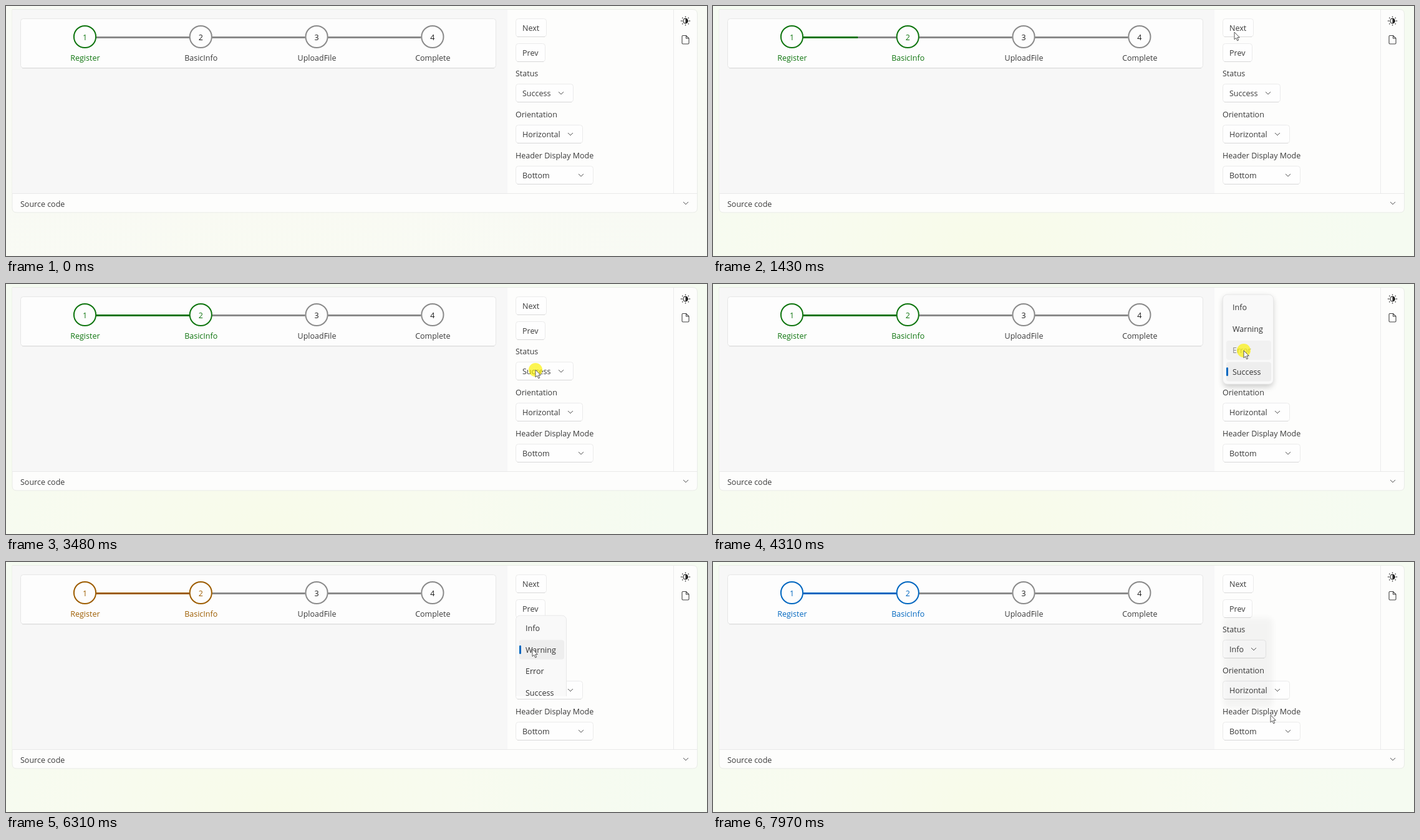
These frames come from a looping animation (1124x402 px, 8000 ms). An HTML page:

```html
<!DOCTYPE html>
<html lang="en">
<head>
<meta charset="utf-8">
<title>Step bar demo</title>
<style>
  html, body { margin: 0; width: 100%; height: 100%; overflow: hidden; background: #f9faf5; }
  svg { display: block; font: 12.5px "Open Sans", "Noto Sans", sans-serif; }
  text { fill: #3a3a3a; white-space: pre; }
  .mid { text-anchor: middle; }
</style>
</head>
<body>
<svg id="stage" width="1124" height="402" viewBox="0 0 1124 402">
  <defs>
    <radialGradient id="tint" gradientUnits="userSpaceOnUse" cx="430" cy="402" r="640" gradientTransform="translate(0 180) scale(1 .55)">
      <stop offset="0" stop-color="#f8fbe9"/>
      <stop offset=".45" stop-color="#f8fbef"/>
      <stop offset="1" stop-color="#f5fbf1"/>
    </radialGradient>
    <filter id="blur" x="-30%" y="-30%" width="160%" height="160%"><feGaussianBlur stdDeviation="5"/></filter>
    <clipPath id="reveal"><rect id="revealBox" x="810" width="100"/></clipPath>
  </defs>
</svg>
<script>
const LOOP = 8000;
const GREY = '#8a8a8a', ACCENT = '#0067c0';
const stage = document.getElementById('stage');
const revealBox = document.getElementById('revealBox');

function set(node, attrs) {
  for (const key in attrs) node.setAttribute(key, attrs[key]);
  return node;
}
function el(tag, attrs, parent = stage) {
  return parent.appendChild(set(document.createElementNS('http://www.w3.org/2000/svg', tag), attrs));
}
function rect(x, y, width, height, fill, extra = {}, parent) {
  return el('rect', { x, y, width, height, fill, ...extra }, parent);
}
function label(x, middle, content, extra = {}, parent) {
  const node = el('text', { x, y: middle + 4.5, ...extra }, parent);
  node.textContent = content;
  return node;
}
function chevron(x, y, parent) {
  return el('path', { d: `M${x - 4} ${y - 2}l4 4l4 -4`, fill: 'none', stroke: '#555' }, parent);
}
const show = (node, on) => set(node, { visibility: on ? 'visible' : 'hidden' });
const clamp = v => Math.max(0, Math.min(1, v));

// Window
rect(0, 0, 1124, 402, '#f9faf5');
const tint = rect(0, 0, 1124, 402, 'url(#tint)');
el('path', { d: 'M10 5.5H1101q7.500 0 7.500 7.500V325q0 7-7 7H17q-7 0-7-7Z', fill: '#fdfdfc', stroke: '#e9ebe7' });
rect(10, 6, 794, 295, '#f7f7f7');
rect(10, 301, 1098, 1, '#e9e9e9');
rect(1070, 6, 1, 295, '#ebebeb');
label(23, 318, 'Source code');
chevron(1090, 317);

// Toolbar icons
el('circle', { cx: 1089.5, cy: 24, r: 3.8, fill: 'none', stroke: '#222', 'stroke-width': 1.2 });
el('path', { d: 'M1089.5 20.200a3.800 3.800 0 0 1 0 7.600Z', fill: '#222' });
for (let i = 0; i < 8; i++) {
  el('path', { d: 'M5.900 0h1.500', stroke: '#222', 'stroke-width': 1.3, transform: `translate(1089.5 24) rotate(${i * 45})` });
}
el('path', { d: 'M1085.500 47.500h5l4.500 4.500v7.500q0 1.500-1.500 1.500h-8q-1.500 0-1.500-1.500V49q0-1.500 1.500-1.500ZM1090.500 47.500V52H1095', fill: 'none', stroke: '#444', 'stroke-width': 1.1 });

// Step bar
rect(23.5, 20.5, 762, 79, '#fdfdfd', { rx: 4, stroke: '#e6e6e6' });
rect(26, 99.5, 757, 1, '#dcdcdc');
const steps = ['Register', 'BasicInfo', 'UploadFile', 'Complete'].map((name, i) => {
  const x = 126.5 + 185.8 * i;
  if (i < 3) rect(x + 18, 49, 149.5, 3, GREY);
  return {
    bar: i < 3 && rect(x + 18, 49, 0, 3, GREY),
    ring: el('circle', { cx: x, cy: 49.5, r: 17.6, fill: '#fdfdfd', 'stroke-width': 2 }),
    number: label(x, 50, i + 1, { class: 'mid' }),
    name: label(x + .4, 83, name, { class: 'mid' })
  };
});

// Settings panel
function box(y, width, parent) {
  const group = el('g', {}, parent);
  const frame = rect(817.5, y + .5, width - 1, 29, '#fefefe', { rx: 4, stroke: '#ebebeb' }, group);
  const edge = rect(820, y + 29, width - 6, 1, '#d8d8d8', {}, group);
  return { group, frame, edge };
}
function button(y, width, name) {
  return { ...box(y, width), text: label(828, y + 15.5, name) };
}
function combo(y, textWidth, name, width = textWidth + 48) {
  const parts = box(y, width);
  label(828, y + 15.5, name, {}, parts.group);
  chevron(817 + width - 20, y + 15, parts.group);
  return parts.group;
}
const next = button(20, 50, 'Next');
const prev = button(60, 48, 'Prev');
label(817, 108.5, 'Status');
label(817, 174.5, 'Orientation');
label(817, 240, 'Header Display Mode');
combo(191, 60, 'Horizontal');
combo(257, 43, 'Bottom', 125);

const statuses = [
  { name: 'Info', color: ACCENT, width: 22 },
  { name: 'Warning', color: '#9d5d00', width: 49 },
  { name: 'Error', color: '#c42b1c', width: 28 },
  { name: 'Success', color: '#0f750f', width: 45 }
];
for (const s of statuses) s.combo = combo(125, s.width, s.name);

// Status list
const PITCH = 34.5, CENTER = 141;
const popup = el('g', {});
const shadow = rect(818, 0, 80, 145, '#000', { rx: 8, filter: 'url(#blur)', opacity: .2 }, popup);
const list = el('g', { 'clip-path': 'url(#reveal)' }, popup);
const sheet = rect(817.5, 0, 81, 144, '#f9f9f9', { rx: 7, stroke: '#e8e8e8' }, list);
const hoverMark = rect(823, 0, 72, 31, '#f1f1f1', { rx: 4 }, list);
rect(823, CENTER - 15.5, 72, 31, '#eeeeee', { rx: 4 }, list);
rect(823, CENTER - 7, 3, 14, ACCENT, { rx: 1.5 }, list);
const items = statuses.map(s => label(833, 0, s.name, {}, list));

// Pointer
const halo = el('circle', { r: 11, fill: '#faf000', opacity: .68 });
const pointer = el('path', { d: 'M0 0V11.800L2.800 9.300L4.700 13.800L6.700 12.900L4.800 8.600H8.300Z', fill: '#fff', stroke: '#555', 'stroke-width': 1 });

const path = [
  [260, 960, 410], [1000, 836, 42], [1900, 836, 42], [2400, 830, 81], [3100, 830, 81],
  [3400, 849, 138], [3900, 849, 138], [4240, 851, 107], [4880, 851, 107], [5050, 850, 136],
  [5230, 850, 136], [5400, 851, 111], [5730, 851, 111], [6000, 844, 140], [6320, 844, 140],
  [6560, 850, 103], [7150, 850, 103], [7960, 894, 246]
];
const presses = [1180, 1665, 2565, 3460, 4270, 5060, 5500, 6140, 6640];
// start, end, selected item
const openings = [[3530, 4350, 3], [5130, 5570, 2], [6210, 6710, 1]];

function pointerAt(t) {
  const i = path.findIndex(p => p[0] > t);
  if (i < 0) return path[path.length - 1].slice(1);
  if (i === 0) return path[0].slice(1);
  const [t0, x0, y0] = path[i - 1], [t1, x1, y1] = path[i];
  const u = (t - t0) / (t1 - t0), k = u * u * (3 - 2 * u);
  return [x0 + (x1 - x0) * k, y0 + (y1 - y0) * k];
}
function statusAt(t) {
  return t < 4350 ? 3 : t < 5570 ? 2 : t < 6710 ? 1 : 0;
}

function drawSteps(t, color) {
  const active = t < 1255 ? 1 : t < 1740 ? 2 : t < 2640 ? 3 : 2;
  const fills = [clamp((t - 1255) / 300), clamp((t - 1740) / 300) - clamp((t - 2640) / 270), 0];
  steps.forEach((s, i) => {
    const on = i < active;
    set(s.ring, { stroke: on ? color : GREY });
    s.number.style.fill = on ? color : '#1c1c1c';
    s.name.style.fill = on ? color : '#3a3a3a';
    if (s.bar) set(s.bar, { width: 149.5 * fills[i], fill: color });
  });
}
function drawButton(b, pressed) {
  b.text.style.fill = pressed ? GREY : '#3a3a3a';
  set(b.frame, { fill: pressed ? '#fafafa' : '#fefefe' });
  show(b.edge, !pressed);
}
function drawPopup(t, y, pressed) {
  const current = openings.find(o => t >= o[0] && t < o[1] + 70);
  show(popup, !!current);
  if (!current) return false;
  const [start, end, selected] = current;
  const grow = 1 - (1 - clamp((t - start) / 250)) ** 3;
  const top = CENTER - selected * PITCH - 21;
  const reach = 16 + grow * (Math.max(CENTER - top, top + 145 - CENTER) - 15);
  const hovered = Math.round((y - CENTER) / PITCH) + selected;
  set(popup, { opacity: t < end ? 1 : 1 - (t - end) / 70 });
  set(revealBox, { y: CENTER - reach, height: reach * 2 });
  set(shadow, { y: top + 4 });
  show(shadow, !!current && grow === 1);
  set(sheet, { y: top + .5 });
  set(hoverMark, { y: CENTER + (hovered - selected) * PITCH - 15.5 });
  items.forEach((item, i) => {
    set(item, { y: CENTER + (i - selected) * PITCH + 4.5 });
    item.style.fill = pressed && i === hovered ? GREY : '#333';
  });
  return t < end;
}

function draw(t) {
  const [x, y] = pointerAt(t);
  const pressed = presses.some(p => t >= p - 70 && t < p + 70);
  const status = statusAt(t);
  set(tint, { opacity: .25 + .75 * clamp((t - 260) / 750) });
  drawSteps(t, statuses[status].color);
  drawButton(next, pressed && t < 2000);
  drawButton(prev, pressed && t > 2000 && t < 3000);
  const open = drawPopup(t, y, pressed);
  statuses.forEach((s, i) => show(s.combo, !open && i === status));
  show(halo, presses.some(p => t >= p && t < p + 130));
  show(pointer, t >= 260);
  set(halo, { cx: x, cy: y });
  set(pointer, { transform: `translate(${x} ${y})` });
}

const began = performance.now();
function tick() {
  draw((performance.now() - began) % LOOP);
  requestAnimationFrame(tick);
}
tick();
</script>
</body>
</html>
```
